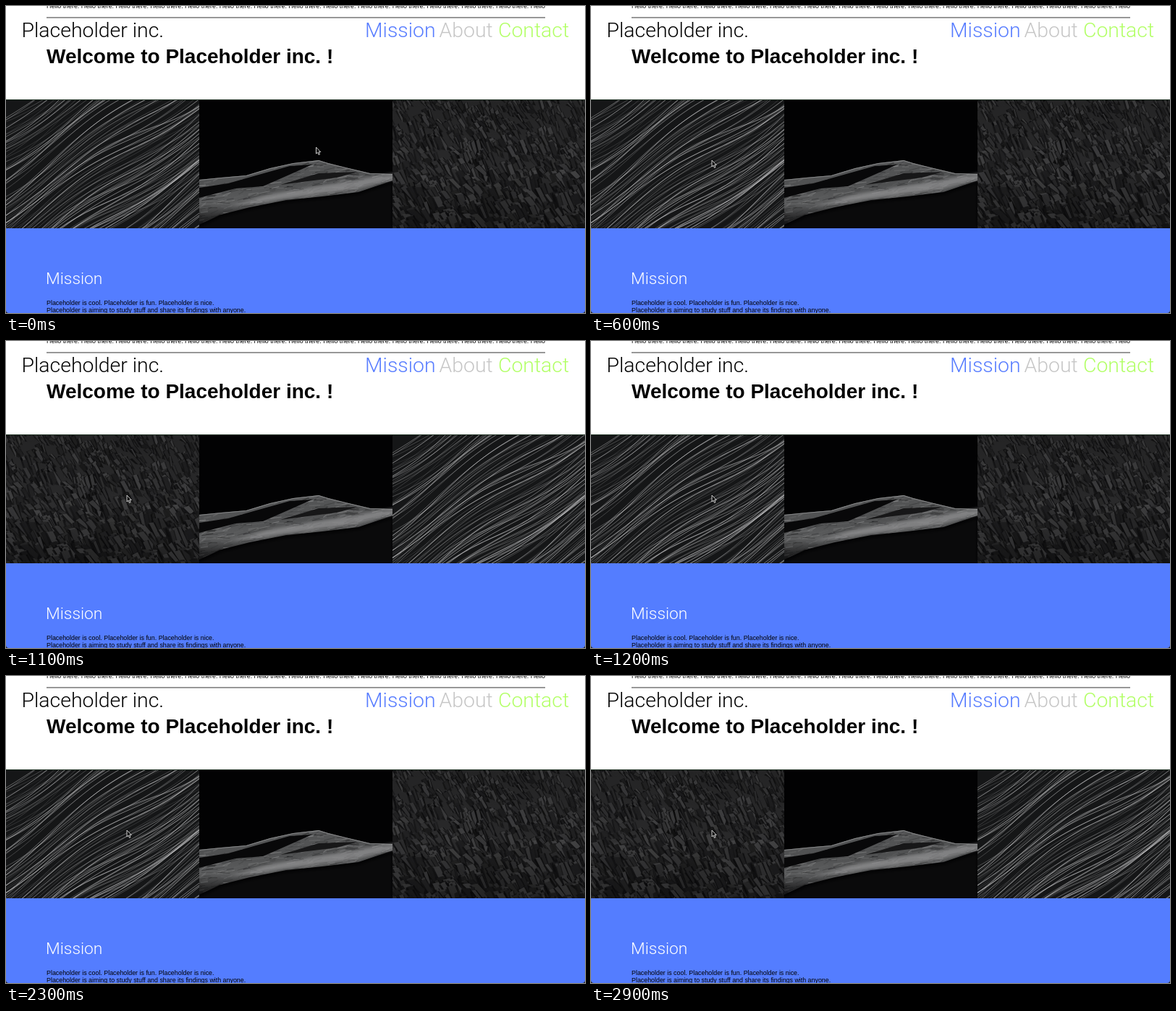
Animation of 800x424 px, one loop 3000 ms. Source, as an HTML page with a canvas:

```html
<!DOCTYPE html>
<html lang="en">
<head>
<meta charset="utf-8">
<title>Placeholder inc.</title>
<style>
html, body { margin: 0; width: 100%; height: 100%; overflow: hidden; background: #fff; }
canvas, svg { position: absolute; left: 0; top: 0; }
canvas { top: 129px; }
text { font: 8.87px "Liberation Sans", Arial, sans-serif; white-space: pre; }
.light { font: 300 28.4px Roboto, "Liberation Sans", sans-serif; }
.bold { font-weight: 700; font-size: 28px; }
.head { font-size: 22.8px; }
</style>
</head>
<body>
<canvas id="fibres" width="267" height="178"></canvas>
<canvas id="ridge" width="267" height="178"></canvas>
<canvas id="slate" width="267" height="178"></canvas>
<svg width="800" height="424" viewBox="0 0 800 424">
  <text id="hello" x="56" y="3"></text>
  <path d="M56 16h689" stroke="#333"/>
  <text class="light" x="21.5" y="43">Placeholder inc.</text>
  <text class="light" x="496" y="43" fill="#587dff">Mission</text>
  <text class="light" x="598.5" y="43" fill="#c6c6c6">About</text>
  <text class="light" x="680" y="43" fill="#b2ff66">Contact</text>
  <text class="bold" x="56" y="79">Welcome to Placeholder inc. !</text>
  <path d="M0 129.5h800" stroke="#26382a"/>
  <path d="M0 307h800v117H0z" fill="#547dff"/>
  <text class="light head" x="55" y="384" fill="#fff">Mission</text>
  <text x="56" y="413">Placeholder is cool. Placeholder is fun. Placeholder is nice.</text>
  <text x="56" y="423">Placeholder is aiming to study stuff and share its findings with anyone.</text>
  <path d="M0 420v4h4Q0 424 0 420M800 420v4h-4q4 0 4-4" fill="#222"/>
  <path id="cursor" d="M0 0V9L2.1 7.2 3.5 10.4 5 9.8 3.7 6.6H6.3z" fill="#111" stroke="#ddd" stroke-width=".9"/>
</svg>
<script>
const $ = id => document.getElementById(id);
const W = 267, H = 178;
let seed = 7;
const rnd = (a = 0, b = 1) => {
  seed = (seed * 16807) % 2147483647;
  return a + (b - a) * seed / 2147483647;
};
const gray = (v, a = 1) => `rgba(${v},${v},${v + 1},${a})`;

function begin(id, fill) {
  const g = $(id).getContext("2d");
  g.fillStyle = fill;
  g.fillRect(0, 0, W, H);
  return g;
}

function poly(g, points, fill) {
  g.beginPath();
  points.forEach(([x, y]) => g.lineTo(x, y));
  g.closePath();
  g.fillStyle = fill;
  g.fill();
}

function drawFibres() {
  const g = begin("fibres", "#151617");
  for (let i = 0; i < 135; i++) {
    const y0 = rnd(25, 350), slope = rnd(.58, .78), phase = rnd(-.5, .5) + y0 / 90;
    const wave = rnd(5, 11);
    g.beginPath();
    for (let x = -5; x <= W + 5; x += 6)
      g.lineTo(x, y0 - slope * x + wave * Math.sin(x / 42 + phase));
    g.strokeStyle = gray(205, rnd(.14, .72));
    g.lineWidth = rnd(.4, 1.05);
    g.stroke();
  }
}

function drawRidge() {
  const g = begin("ridge", "#020203");
  const crest = [[0, 111], [30, 108], [65, 105], [98, 95], [130, 88], [165, 84],
    [178, 88], [202, 94], [236, 102], [267, 103]];
  const lit = g.createLinearGradient(0, 84, 0, 170);
  lit.addColorStop(0, "#555657");
  lit.addColorStop(.4, "#505152");
  lit.addColorStop(.7, "#5c5d5e");
  lit.addColorStop(1, "#181819");
  const foot = [[267, 112], [220, 128], [170, 134], [120, 139], [70, 149], [30, 159], [0, 173]];
  poly(g, [...crest, ...foot], lit);

  // Rough grain following the slope of the rock.
  g.save();
  g.clip();
  for (let i = 0; i < 650; i++) {
    const x = rnd(-10, W), y = rnd(84, 172);
    g.beginPath();
    g.moveTo(x, y);
    g.lineTo(x + rnd(5, 18), y - rnd(-1, 5));
    g.strokeStyle = gray(rnd() < .6 ? 12 : 165, rnd(.1, .4));
    g.lineWidth = rnd(.5, 1.6);
    g.stroke();
  }
  g.restore();

  poly(g, [[0, 122], [40, 116], [75, 106], [125, 92], [156, 90], [120, 106],
    [88, 120], [50, 123], [0, 136]], "#080809");
  poly(g, [[112, 118], [165, 102], [220, 100], [190, 108], [150, 113]], "#171718");
  g.lineJoin = "round";
  g.strokeStyle = "#858687";
  g.lineWidth = 1.2;
  g.beginPath();
  crest.forEach(([x, y]) => g.lineTo(x, y + .5));
  g.stroke();

  g.filter = "blur(2px)";
  poly(g, [[40, 148], [95, 132], [150, 122], [200, 114], [270, 102], [270, 110],
    [215, 124], [155, 132], [95, 140]], "rgba(155,156,157,.65)");
  poly(g, [...foot.map(([x, y]) => [x, y + 3]), [0, 180], [267, 180]], "#0a0a0b");
  g.filter = "none";
}

function drawSlate() {
  const g = begin("slate", "#29292a");
  for (let i = 0; i < 850; i++) {
    const y = -12 + 190 * i / 850, x = rnd(-15, W + 5);
    const size = .55 + y / 220, w = rnd(4, 13) * size, h = rnd(12, 34) * size;
    const lean = rnd(2, 12) * size, tone = rnd(26, 74);
    poly(g, [[x - 2, y + 3], [x + w * .8, y], [x + w + lean + 2, y + h], [x + lean, y + h * .85]],
      gray(rnd(9, 25), .75));
    poly(g, [[x, y + rnd(0, 4)], [x + w * .6, y], [x + w + lean * .6, y + h * .65],
      [x + w * .5 + lean, y + h]], gray(tone, .85));
  }
  const shade = g.createLinearGradient(0, 0, 0, H);
  shade.addColorStop(0, "rgba(0,0,0,.12)");
  shade.addColorStop(.55, "rgba(0,0,0,0)");
  shade.addColorStop(1, "rgba(0,0,0,.3)");
  g.fillStyle = shade;
  g.fillRect(0, 0, W, H);
}

$("hello").textContent = "Hello there. ".repeat(14) + "Hello";
drawFibres();
drawRidge();
drawSlate();
$("ridge").style.left = "267px";

function frame(now) {
  const t = now % 3000;
  // The pointer moves in 100 ms steps; the outer pictures trade places on click.
  const step = Math.min(1, Math.max(0, (Math.floor(t / 100) - 2) / 4));
  const p = step * step * (3 - 2 * step);
  $("cursor").setAttribute("transform", `translate(${428.5 - 261.5 * p} ${195 + 18 * p})`);
  const swapped = t >= 800 && t < 1200 || t >= 2400;
  $("fibres").style.left = swapped ? "534px" : 0;
  $("slate").style.left = swapped ? 0 : "534px";
  requestAnimationFrame(frame);
}
frame(0);
</script>
</body>
</html>
```
